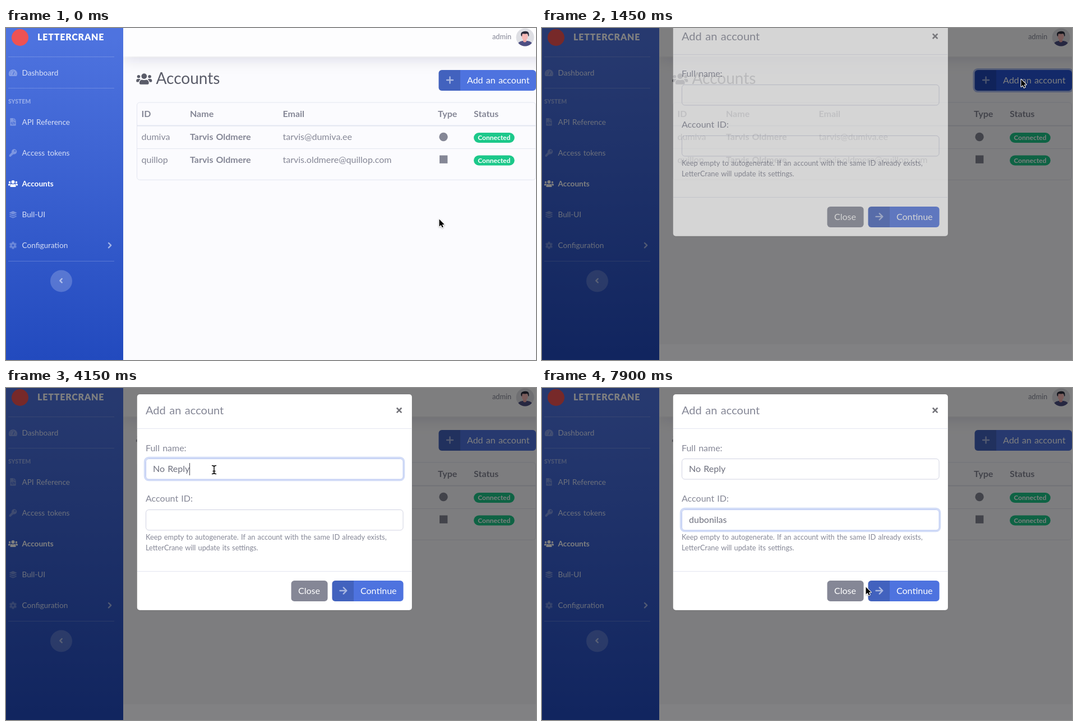
Animation of 945x593 px, one loop 8000 ms. Source, as an HTML page:

```html
<!DOCTYPE html>
<html lang="en">
<head>
<meta charset="utf-8">
<title>Add an account</title>
<style>
html, body { margin: 0; width: 100%; height: 100%; overflow: hidden; background: #fbfbfe; }
svg { display: block; width: 945px; height: 593px; }
text { font: 16px Lato, "Open Sans", sans-serif; word-spacing: .07em; white-space: pre; fill: #858796; }
.b, .b text { font-weight: 700; }
.nav text { font-size: 13.6px; fill: #fff; fill-opacity: .8; }
.nav .on { font-weight: 700; fill-opacity: 1; }
.nav .head { font-size: 10.4px; font-weight: 900; fill-opacity: .4; }
.nav .brand { font-size: 16px; font-weight: 900; letter-spacing: .05em; fill-opacity: 1; }
.rule { stroke: #fff; stroke-opacity: .2; }
.icon { fill: #fff; opacity: .32; }
.cut { fill: none; stroke: #3f66d6; stroke-width: 44; stroke-linecap: round; stroke-linejoin: round; }
.h1 { font-size: 28px; fill: #5a5c69; }
.h5 { font-size: 20px; }
.small { font-size: 12.8px; }
.badge rect { fill: #1cc88a; }
.badge text { font-size: 12px; font-weight: 700; fill: #fff; text-anchor: middle; }
.btn text { fill: #fff; }
.mark { fill: none; stroke: #fff; stroke-opacity: .55; stroke-width: 2.4; stroke-linecap: round; stroke-linejoin: round; }
.line { fill: none; stroke: #e3e6f0; }
.field { fill: #fff; stroke: #d1d3e2; }
.field.focus { stroke: #bac8f3; }
.glow { fill: none; stroke: #4e73df; stroke-opacity: .25; stroke-width: 3.2; }
.typed { fill: #6e707e; }
</style>
</head>
<body>
<svg viewBox="0 0 945 593" xmlns="http://www.w3.org/2000/svg">
  <defs>
    <linearGradient id="side" x1="0" y1="0" x2="0" y2="1">
      <stop offset=".03" stop-color="#4e73df"/><stop offset="1" stop-color="#224abe"/>
    </linearGradient>
    <filter id="soft" filterUnits="userSpaceOnUse" x="150" y="-80" width="900" height="200">
      <feGaussianBlur stdDeviation="14"/>
    </filter>
    <filter id="lift" x="-1" y="-1" width="3" height="3">
      <feDropShadow dx="0" dy="1" stdDeviation="1" flood-opacity=".35"/>
    </filter>
    <clipPath id="face"><circle cx="925.5" cy="16.5" r="16"/></clipPath>
    <g id="users">
      <circle cx="96" cy="160" r="64"/><circle cx="544" cy="160" r="64"/><circle cx="320" cy="144" r="112"/>
      <path d="M128 432v-29a115 115 0 0 1 115-115q77 32 154 0a115 115 0 0 1 115 115v29a48 48 0 0 1-48 48H176a48 48 0 0 1-48-48z"/>
      <path id="side-man" d="M0 352v-32a64 64 0 0 1 64-64h64q26 0 45 19-66 36-75 109H32a32 32 0 0 1-32-32z"/>
      <use href="#side-man" transform="matrix(-1 0 0 1 640 0)"/>
    </g>
    <path id="layer" d="M12 245l57-26 158 72q29 13 58 0l158-72 57 26q24 11 0 22L272 370q-16 7-32 0L12 267q-24-11 0-22z"/>
    <rect id="tooth" x="-62" y="-246" width="124" height="110" rx="26"/>
    <path id="bar" d="M-3.500-7.500Q0-7.500 0-5Q0-7.500 3.500-7.500M0-5V5M-3.500 7.500Q0 7.500 0 5Q0 7.500 3.500 7.500M-2 2.500H2"/>
  </defs>

  <rect width="945" height="593" fill="#fbfbfe"/>
  <rect x="209" y="-30" width="800" height="83.400" fill="#3a3b45" fill-opacity=".15" filter="url(#soft)"/>
  <rect x="209" width="736" height="51" fill="#fdfdfe"/>
  <text class="small" x="867" y="20">admin</text>
  <g clip-path="url(#face)">
    <rect x="909" width="33" height="33" fill="#dedfe4"/>
    <path d="M911 33q1-9 10-10h9q9 1 10 10z" fill="#4d4f83"/>
    <path d="M922 18h6v6q-3 3-6 0z" fill="#eda6a4"/>
    <ellipse cx="925" cy="15" rx="5.5" ry="6.7" fill="#f5b9b6"/>
    <path d="M918.500 14q-2-7 5-8 10-2 9 8l-1.500 1q0-4-2-5-4 1-8 0-1 2-1 5z" fill="#292a3a"/>
  </g>

  <g class="nav">
    <rect width="209" height="593" fill="url(#side)"/>
    <circle cx="25" cy="17" r="15" fill="#ee5253"/>
    <text class="brand" x="56" y="22">LETTERCRANE</text>
    <path class="rule" d="M4 51.500H193M4 107.500H193M4 416.500H193"/>
    <text x="28.500" y="85">Dashboard</text>
    <text class="head" x="4" y="135">SYSTEM</text>
    <text x="28.500" y="172.500">API Reference</text>
    <text x="28.500" y="228">Access tokens</text>
    <text class="on" x="28.500" y="283">Accounts</text>
    <text x="28.500" y="338">Bull-UI</text>
    <text x="28.500" y="393">Configuration</text>
    <g class="icon" transform="translate(4.800 73.200) scale(.02656)">
      <path d="M0 320a288 288 0 1 1 537 144q-8 16-25 16H64q-17 0-25-16A288 288 0 0 1 0 320z"/>
      <path class="cut" d="M288 380L370 190M96 330h1M150 196h1M288 120h1M478 330h1"/>
    </g>
    <g class="icon" transform="translate(7.400 161) scale(.02656)">
      <path d="M224 136V0H24Q0 0 0 24v464q0 24 24 24h336q24 0 24-24V160H248q-24 0-24-24zM384 122L262 0h-6v128h128z"/>
      <path class="cut" d="M120 270l-56 65 56 65M264 270l56 65-56 65M214 250l-44 170"/>
    </g>
    <path class="icon" fill-rule="evenodd" transform="translate(5.700 216.200) scale(.02656)" d="M512 176a176 176 0 0 1-227 168l-27 32q-7 8-18 8h-40v40q0 24-24 24h-40v40q0 24-24 24H24q-24 0-24-24v-78q0-10 7-17l161-161A176 176 0 1 1 512 176zM336 128a48 48 0 1 0 96 0a48 48 0 1 0-96 0z"/>
    <use href="#users" fill="#fff" transform="translate(4 271.200) scale(.02656)"/>
    <g class="icon" transform="translate(5.700 326.400) scale(.02656)">
      <path d="M12 148L240 252q16 7 32 0l228-104q24-11 0-22L272 22q-16-7-32 0L12 126q-24 11 0 22z"/>
      <use href="#layer"/><use href="#layer" y="124"/>
    </g>
    <g class="icon" transform="translate(12.500 388.300) scale(.02656)">
      <circle r="130" fill="none" stroke="#fff" stroke-width="100"/>
      <use href="#tooth"/><use href="#tooth" transform="rotate(60)"/><use href="#tooth" transform="rotate(120)"/>
      <use href="#tooth" transform="rotate(180)"/><use href="#tooth" transform="rotate(240)"/><use href="#tooth" transform="rotate(300)"/>
    </g>
    <path class="mark" d="M183 384l4.200 4.200-4.200 4.200"/>
    <circle cx="98.500" cy="452" r="19.500" fill="#fff" fill-opacity=".2"/>
    <path class="mark" d="M99.700 447.900l-3.400 3.400 3.400 3.400"/>
  </g>

  <use href="#users" fill="#5a5c69" transform="translate(232.300 79.800) scale(.0437)"/>
  <text class="h1" x="267.500" y="100">Accounts</text>
  <g class="btn">
    <rect id="ring" x="770" y="73.500" width="176.500" height="40" rx="7" fill="none" stroke="#6988e4" stroke-opacity=".55" stroke-width="3.200"/>
    <rect id="add" x="771.500" y="75" width="173.500" height="37" rx="5.600"/>
    <path d="M810 75h-33q-5.500 0-5.500 5.500v26q0 5.500 5.500 5.500h33z" fill-opacity=".15"/>
    <path class="mark" d="M786 93h11M791.500 87.500v11"/>
    <text x="822" y="99">Add an account</text>
  </g>

  <rect class="line" x="233.500" y="133" width="711" height="138.300" rx="5"/>
  <path class="line" d="M234 174.500H944" stroke-width="2"/>
  <path class="line" d="M234 215.500H944"/>
  <g class="b">
    <text x="241.500" y="159">ID</text><text x="328" y="159">Name</text><text x="493.500" y="159">Email</text>
    <text x="770" y="159">Type</text><text x="834" y="159">Status</text>
    <text x="328" y="200">Tarvis Oldmere</text><text x="328" y="241">Tarvis Oldmere</text>
  </g>
  <text x="241.500" y="200">dumiva</text><text x="493.500" y="200">tarvis@dumiva.ee</text>
  <text x="241.500" y="241">quillop</text><text x="493.500" y="241">tarvis.oldmere@quillop.com</text>
  <circle cx="780" cy="194.500" r="7.700" fill="#858796"/>
  <rect x="773" y="227.500" width="14.300" height="14.300" fill="#858796"/>
  <g class="badge">
    <rect x="834" y="187" width="72.700" height="18" rx="9"/><text x="870.300" y="200.200">Connected</text>
    <rect x="834" y="227.500" width="72.700" height="18" rx="9"/><text x="870.300" y="240.700">Connected</text>
  </g>

  <rect id="dim" width="945" height="593"/>
  <rect id="strip" x="209" y="565" width="736" height="28" fill="#fff" fill-opacity=".03"/>

  <g id="modal">
    <rect x="233.500" y="11" width="490.500" height="386" rx="5" fill="#fff" stroke="#000" stroke-opacity=".2"/>
    <text class="h5" x="249" y="47">Add an account</text>
    <path d="M696.700 35.500l8.600 8.600m0-8.600l-8.600 8.600" stroke="#74747a" stroke-width="2.500"/>
    <path class="line" d="M234 72.500H723.500M234 327.500H723.500"/>
    <text x="249" y="112.500">Full name:</text>
    <text x="249" y="203">Account ID:</text>
    <g class="form"></g>
    <text class="small" x="249" y="271">Keep empty to autogenerate. If an account with the same ID already exists,</text>
    <text class="small" x="249" y="289.700">LetterCrane will update its settings.</text>
    <g class="btn">
      <rect x="508.500" y="344" width="65" height="37" rx="5.600" fill="#858796"/>
      <text x="521" y="368">Close</text>
      <rect x="581.500" y="344" width="127" height="37" rx="5.600" fill="#4e73df"/>
      <path d="M620 344h-33q-5.500 0-5.500 5.500v26q0 5.500 5.500 5.500h33z" fill-opacity=".15"/>
      <path class="mark" d="M595.500 362h11.500M601.700 356.400l5.600 5.600-5.600 5.600"/>
      <text x="632" y="368">Continue</text>
    </g>
  </g>

  <g id="arrow" filter="url(#lift)">
    <path d="M.5 1.500V14.500L3.600 11.700 5.700 16.300 7.700 15.400 5.700 10.900H9.700z" stroke="#fff" stroke-width="2" stroke-linejoin="round" paint-order="stroke"/>
  </g>
  <g id="beam" fill="none" stroke-linecap="round">
    <use href="#bar" stroke="#fff" stroke-width="3"/>
    <use href="#bar" stroke="#000" stroke-width="1.400"/>
  </g>
</svg>
<script>
const LOOP = 8000;
const $ = id => document.getElementById(id);
const clamp = v => Math.max(0, Math.min(1, v));
const span = (t, a, b) => clamp((t - a) / (b - a));
const within = (t, a, b) => t >= a && t < b;
const show = (el, on) => el.setAttribute('visibility', on ? 'inherit' : 'hidden');
const smooth = p => p < .5 ? 4 * p ** 3 : 1 - (2 - 2 * p) ** 3 / 2;
const linear = p => p;

// Each field: typed text, [time, letters] steps, focus and caret-on intervals.
const fields = [
  { y: 126, text: 'No Reply', focus: [2200, 5650],
    keys: [[3100, 1], [3250, 2], [3550, 3], [3700, 4], [3850, 5], [4000, 6], [4150, 8]],
    caret: [[2200, 2650], [3100, 4750], [5200, 5650]] },
  { y: 217, text: 'dubonilas', focus: [5650, LOOP],
    keys: [[6100, 1], [6250, 2], [6400, 3], [6550, 4], [6700, 5], [6850, 7], [7150, 9]],
    caret: [[5800, 7600]] }
];

const form = document.querySelector('.form');
function make(tag, attrs) {
  const el = document.createElementNS('http://www.w3.org/2000/svg', tag);
  for (const k in attrs) el.setAttribute(k, attrs[k]);
  return form.appendChild(el);
}
for (const f of fields) {
  f.glow = make('rect', { class: 'glow', x: 247.4, y: f.y - 1.6, width: 462.2, height: 40.2, rx: 7 });
  f.box = make('rect', { class: 'field', x: 249.5, y: f.y + .5, width: 458.5, height: 36.5, rx: 5.2 });
  f.label = make('text', { class: 'typed', x: 262, y: f.y + 24 });
  f.bar = make('rect', { y: f.y + 8, width: 1, height: 22, fill: '#3f404a' });
}

const moves = [
  { a: 150, b: 1050, from: [772, 340], to: [856, 90], ease: smooth },
  { a: 1380, b: 2050, from: [856, 90], to: [371, 146], ease: smooth },
  { a: 5050, b: 5500, from: [371, 146], to: [479, 237], ease: linear },
  { a: 7450, b: 7900, from: [479, 237], to: [577, 354], ease: linear }
];

// The screen refreshes in short holds rather than continuously.
function hold(t) {
  if (t < 1190) return Math.floor(t / 150) * 150;
  if (t < 1310) return 1190;
  if (t < 1450) return 1310;
  return 1450 + 150 * Math.floor((t - 1450) / 150);
}

function pointer(t) {
  const m = moves.filter(m => t >= m.a).pop() || moves[0];
  const p = m.ease(span(t, m.a, m.b));
  return m.from.map((v, i) => v + (m.to[i] - v) * p);
}

function drawField(f, t) {
  const focus = within(t, ...f.focus);
  const key = f.keys.filter(k => t >= k[0]).pop();
  const n = key ? key[1] : 0;
  show(f.glow, focus);
  f.box.classList.toggle('focus', focus);
  f.label.textContent = f.text.slice(0, n);
  f.bar.setAttribute('x', 262 + (n ? Math.round(f.label.getComputedTextLength()) : 0));
  show(f.bar, f.caret.some(c => within(t, ...c)));
}

function draw(time) {
  const t = hold(time);
  const [x, y] = pointer(t);

  const pressed = within(t, 1190, 1750);
  const hover = t < 1190 && y < 112 && x > 771;
  $('add').setAttribute('fill', pressed ? '#2653d4' : hover ? '#2e59d9' : '#4e73df');
  show($('ring'), pressed);

  $('dim').setAttribute('fill-opacity', .5 * span(t, 1190, 1340));
  show($('strip'), t >= 1450);

  const drop = -50 * (1 - span(t, 1350, 1650)) ** 1.7;
  $('modal').setAttribute('opacity', span(t, 1350, 1500));
  $('modal').setAttribute('transform', `translate(0 ${drop.toFixed(2)})`);
  show($('modal'), t > 1350);
  fields.forEach(f => drawField(f, t));

  const beam = t >= 1600 && x > 249 && x < 708 && fields.some(f => y > f.y && y < f.y + 37);
  show($('beam'), beam);
  show($('arrow'), !beam);
  $(beam ? 'beam' : 'arrow').setAttribute('transform', `translate(${x.toFixed(1)} ${y.toFixed(1)})`);
}

function tick() {
  draw(performance.now() % LOOP);
  requestAnimationFrame(tick);
}
tick();
</script>
</body>
</html>
```
